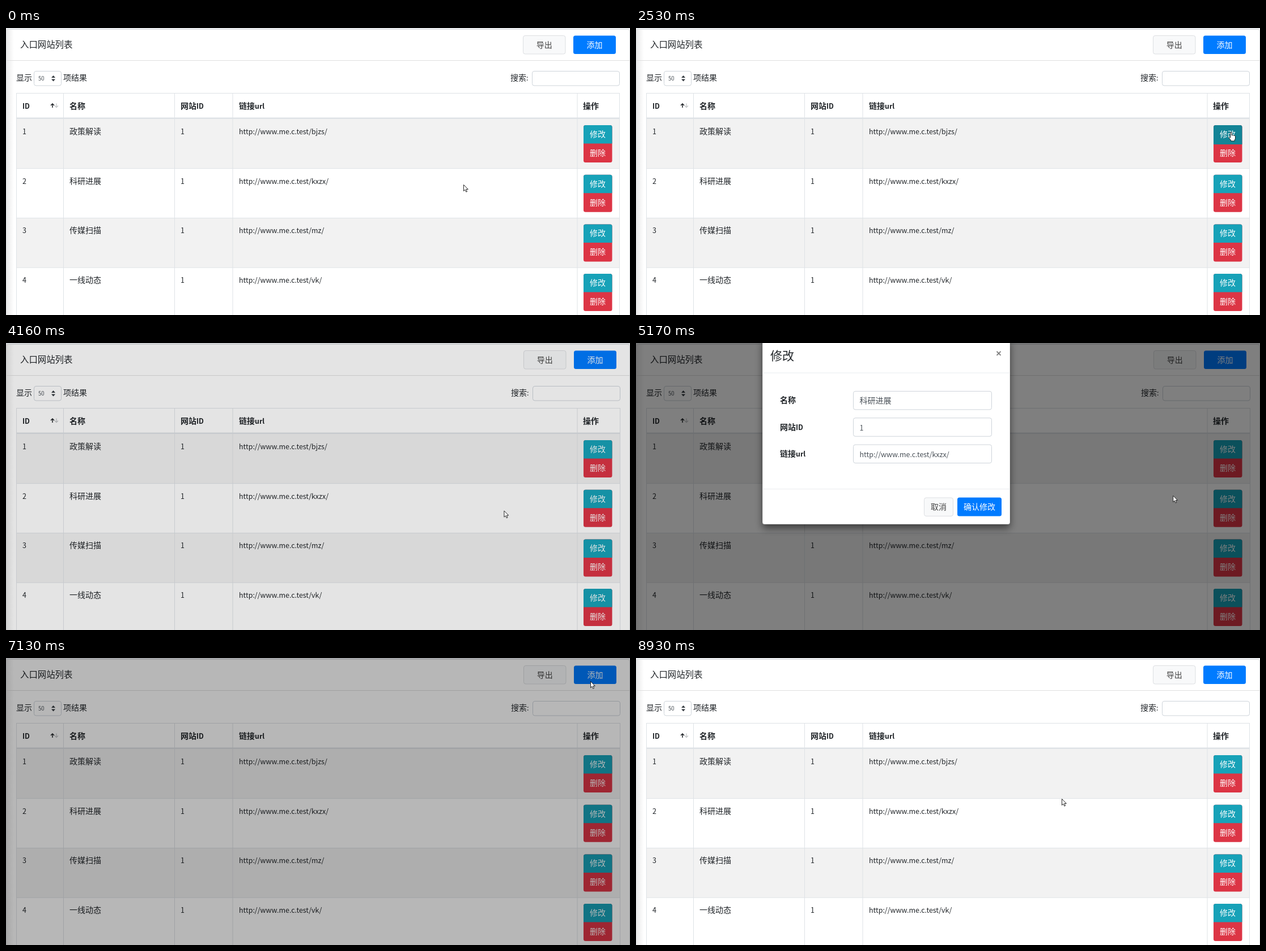
Recreate the animation shown at these times as an HTML page. Size 1101 by 508 pixels, loop 9470 ms.

```html
<!DOCTYPE html>
<html lang="zh">
<head>
<meta charset="utf-8">
<title>入口网站列表</title>
<style>
html, body { margin: 0; width: 100%; height: 100%; overflow: hidden; background: #fff; }
svg { display: block; width: 100vw; height: 100vh; }
text { font-family: "Noto Sans CJK SC", "Noto Sans CJK", "Noto Sans", sans-serif; white-space: pre; }
</style>
</head>
<body>
<svg id="stage" viewBox="0 0 1101 508"></svg>
<script>
const LOOP = 9470;
const INK = '#212529', LINE = '#dee2e6', BLUE = '#007bff', TEAL = '#17a2b8', RED = '#dc3545';
const ROW_TOP = 161, ROW_H = 87.7;
const BASE = 'http://www.me.c.test/';
const rows = [
  ['政策解读', 'bjzs/'], ['科研进展', 'kxzx/'], ['传媒扫描', 'mz/'], ['一线动态', 'vk/'],
  ['通知公告', 'tzgg/'], ['综合新闻', 'zhxw/'], ['学术会议', 'xshy/'], ['合作交流', 'hzjl/'],
  ['人才招聘', 'rczp/'], ['专题报道', 'ztbd/'], ['科普文章', 'kpwz/'], ['图片新闻', 'tpxw/'],
  ['视频资料', 'spzl/'], ['成果转化', 'cgzh/']
];

// Each dialog: backdrop start, dismissal, title and field values.
const dialogs = [
  { open: 2826, close: 3893, title: '修改', values: [rows[0][0], '1', BASE + rows[0][1]] },
  { open: 4842, close: 6068, title: '修改', values: [rows[1][0], '1', BASE + rows[1][1]] },
  { open: 7046, close: 8510, title: '添加', values: ['', '', ''] }
];

// Moves: start, end, then the value reached.
const scrollMoves = [[50, 900, 380], [1040, 1520, 640], [1960, 2360, 0]];
const cursorMoves = [
  [2200, 2500, [1050, 184]], [2880, 3225, [772, 278]], [3225, 3760, [780, 311]],
  [3930, 4490, [1046, 272]], [4490, 4710, [1044, 275]], [4960, 5450, [800, 262]],
  [5450, 5860, [791, 258]], [6130, 6790, [1031, 41]], [7150, 7660, [751, 249]]
];

// Latin glyphs are set smaller so they sit evenly beside the Chinese ones.
function text(x, y, str, { size = 14, weight = 400, fill = INK, anchor = 'start' } = {}) {
  const body = str.replace(/[!-~]+/g, s => `<tspan font-size="${size * 0.89}">${s}</tspan>`);
  return `<text x="${x}" y="${y}" font-size="${size}" font-weight="${weight}" fill="${fill}" text-anchor="${anchor}">${body}</text>`;
}
function box(x, y, w, h, fill, stroke = 'none', r = 3.5, extra = '') {
  return `<rect x="${x}" y="${y}" width="${w}" height="${h}" rx="${r}" fill="${fill}" stroke="${stroke}" ${extra}/>`;
}
function line(x1, y1, x2, y2, width = 1, color = LINE) {
  return `<path d="M${x1} ${y1}L${x2} ${y2}" stroke="${color}" stroke-width="${width}" fill="none"/>`;
}
function button(x, y, w, h, label, fill, color, stroke = fill, weight = 400, extra = '') {
  return box(x, y, w, h, fill, stroke, 3.5, extra) +
    text(x + w / 2, y + h / 2 + 5.2, label, { fill: color, anchor: 'middle', weight });
}
const topTab = (y, h) => `M1019 ${y + h}V${y + 3.5}q0-3.5 3.5-3.5H1066q3.5 0 3.5 3.5V${y + h}Z`;
const rowY = i => ROW_TOP + i * ROW_H;

function pageMarkup() {
  const bottom = rowY(rows.length);
  let s = `<rect width="1101" height="${bottom + 100}" fill="#fff"/>
    <rect y="2" width="14" height="${bottom + 98}" fill="url(#edge)"/>
    <rect width="1101" height="2" fill="#ebedf0"/>` +
    `<path d="M.5 ${bottom + 80}V6q0-3.5 3.5-3.5H1097q3.5 0 3.5 3.5V${bottom + 80}" fill="none" stroke="#dcdee0"/>` +
    line(1, 57.5, 1101, 57.5, 1, '#dfdfdf') +
    text(25, 35, '入口网站列表', { size: 15.4 }) +
    text(18, 93, '显示') + box(49.5, 76.5, 48, 25.5, '#fff', '#ced4da') +
    text(57, 93, '50', { size: 10.8, fill: '#495057' }) +
    '<path d="M80 88l3.5-4 3.5 4zM80 90.5l3.5 4 3.5-4z" fill="#343a40"/>' +
    text(101, 93, '项结果');
  rows.forEach((_, i) => {
    if (i % 2 === 0) s += `<rect x="18" y="${rowY(i)}" width="1065" height="${ROW_H}" fill="#f2f2f2"/>`;
  });
  s += line(18, 115.5, 1083, 115.5);
  for (const x of [18.5, 101.5, 297.5, 400, 1008]) s += line(x, 115, x, bottom);
  s += line(18, 159.8, 1083, 159.8, 2.4);
  [[29, 'ID'], [112, '名称'], [308, '网站ID'], [411, '链接url'], [1018, '操作']]
    .forEach(([x, label]) => s += text(x, 143, label, { weight: 700 }));
  s += '<path d="M82 141v-7M79 137l3-3 3 3" fill="none" stroke="#212529" stroke-width="1.5"/>' +
    '<path d="M89 133.5v7M86 137.5l3 3 3-3" fill="none" stroke="#c3c5c7" stroke-width="1.3"/>';
  rows.forEach(([name, path], i) => {
    const y = rowY(i);
    s += text(29, y + 27, String(i + 1)) + text(112, y + 27, name) + text(308, y + 27, '1') +
      text(411, y + 27, BASE + path) +
      line(18, y + ROW_H, 1083, y + ROW_H) +
      box(1019, y + 11, 50.5, 66, RED) +
      text(1044, y + 65, '删除', { fill: '#fff', anchor: 'middle' }) +
      `<path class="edit" d="${topTab(y + 11, 32.5)}" fill="${TEAL}"/>` +
      text(1044, y + 32, '修改', { fill: '#fff', anchor: 'middle' });
  });
  return s + '<g id="right">' +
    button(912.5, 13.5, 74.5, 32.5, '导出', '#f8f9fa', '#444', '#dddfe2') +
    button(1001, 13.5, 75, 32.5, '添加', BLUE, '#fff', 'none', 500, 'id="add"') +
    text(890, 93, '搜索:') + box(928.5, 76.5, 154, 25.5, '#fff', '#ced4da') +
    line(1082.5, 115, 1082.5, bottom) + '</g>';
}

function dialogMarkup({ title, values }) {
  let s = box(223, 2, 437, 328.5, '#fff', 'rgba(0,0,0,.2)', 4, 'filter="url(#shadow)"') +
    text(237, 40, title, { size: 21 }) +
    '<path d="M636.5 24.5l7 7M643.5 24.5l-7 7" stroke="#7f7f7f" stroke-width="1.9"/>' +
    line(223, 62.5, 660, 62.5, 1, '#e9ecef') + line(223, 268, 660, 268, 1, '#e9ecef');
  ['名称', '网站ID', '链接url'].forEach((label, i) => {
    const y = 95 + i * 47.3;
    s += text(254, y + 21, label, { weight: 700 }) +
      box(383.5, y, 244, 32.5, '#fff', '#ced4da') +
      text(394.5, y + 21.8, values[i], { fill: '#495057' });
  });
  return `<g class="dialog">${s}` +
    button(508.5, 283.5, 51, 32.5, '取消', '#f8f9fa', '#444', '#dddfe2') +
    button(567, 283, 78, 33, '确认' + title, BLUE, '#fff', 'none', 500) + '</g>';
}

const stage = document.getElementById('stage');
stage.innerHTML = `<defs>
  <linearGradient id="edge"><stop stop-color="#e9e9e9"/><stop offset="1" stop-color="#fff"/></linearGradient>
  <filter id="shadow" x="-10%" y="-10%" width="120%" height="125%">
    <feDropShadow dx="0" dy="7" stdDeviation="7" flood-color="#000" flood-opacity=".5"/></filter></defs>
  <g id="page">${pageMarkup()}</g>
  <rect id="backdrop" width="1101" height="508"/>
  ${dialogs.map(dialogMarkup).join('')}
  <g id="cursor" stroke="#111" stroke-width=".9" fill="#fff" stroke-linejoin="round">
    <path id="arrow" d="M.5.5V11.6L3 9.2 4.8 13.2 6.6 12.4 4.9 8.5H8.3Z"/>
    <path id="hand" d="M-1.2 1q1.2-1.6 2.4 0V6q1.2-.9 2.2.2 1.2-.8 2.2.4 1.6-.4 1.9 1V11q0 2-1.4 3.4V16H-.4V14.6Q-1.7 13-3.7 10.4-4.2 8.8-2.7 8.9L-1.2 10.2Z"/>
  </g>`;
const el = id => document.getElementById(id);
const [page, right, addButton, backdrop, cursor, arrow, hand] =
  ['page', 'right', 'add', 'backdrop', 'cursor', 'arrow', 'hand'].map(el);
const editButtons = [...document.querySelectorAll('.edit')];
const dialogEls = [...document.querySelectorAll('.dialog')];

const unit = v => Math.min(1, Math.max(0, v));
const smooth = u => u * u * (3 - 2 * u);
const mix = (a, b, k) => a + (b - a) * k;

// CSS ease-out: cubic-bezier(0, 0, .58, 1).
function easeOut(x) {
  let lo = 0, hi = 1;
  for (let i = 0; i < 20; i++) {
    const s = (lo + hi) / 2;
    if (1.74 * s * s * (1 - s) + s ** 3 < x) lo = s; else hi = s;
  }
  return lo * lo * (3 - 2 * lo);
}
function follow(moves, start, t, blend) {
  return moves.reduce((value, [from, to, goal]) =>
    t <= from ? value : blend(value, goal, smooth(unit((t - from) / (to - from)))), start);
}

function draw(t) {
  const scroll = follow(scrollMoves, 0, t, mix);
  const [x, y] = follow(cursorMoves, [807, 277], t,
    (a, b, k) => [mix(a[0], b[0], k), mix(a[1], b[1], k)]);

  let shade = 0, busy = false;
  dialogs.forEach(({ open, close }, i) => {
    const active = t >= open && t < close + 300;
    const shown = open + 150;
    if (active) {
      busy = true;
      shade = 0.5 * unit((t - open) / 150) * (1 - unit((t - close - 150) / 150));
    }
    const alpha = unit((t - shown) / 150) * (1 - unit((t - close) / 150));
    const slide = easeOut(unit((t - shown) / 300)) - easeOut(unit((t - close) / 300));
    dialogEls[i].style.display = active && alpha > 0 ? '' : 'none';
    dialogEls[i].setAttribute('opacity', alpha);
    dialogEls[i].setAttribute('transform', `translate(0 ${-44 * (1 - slide)})`);
  });

  page.setAttribute('transform', `translate(0 ${-scroll})`);
  right.setAttribute('transform', `translate(${busy ? 1 : 0} 0)`);
  backdrop.setAttribute('opacity', shade);

  const overAdd = !busy && x > 1001 && x < 1076 && y > 13 && y < 46;
  addButton.setAttribute('fill', overAdd ? '#0069d9' : BLUE);
  let pointing = overAdd;
  editButtons.forEach((edit, i) => {
    const top = rowY(i) + 11, dy = y + scroll - top;
    const over = !busy && x > 1019 && x < 1069 && dy > 0 && dy < 33;
    pointing = pointing || over;
    edit.setAttribute('fill', over ? '#138496' : TEAL);
    edit.setAttribute('d', topTab(top, over ? 34 : 32.5));
  });
  arrow.style.display = pointing ? 'none' : '';
  hand.style.display = pointing ? '' : 'none';
  cursor.setAttribute('transform', `translate(${x} ${y})`);
}

const began = performance.now();
function tick() {
  draw((performance.now() - began) % LOOP);
  requestAnimationFrame(tick);
}
tick();
</script>
</body>
</html>
```
